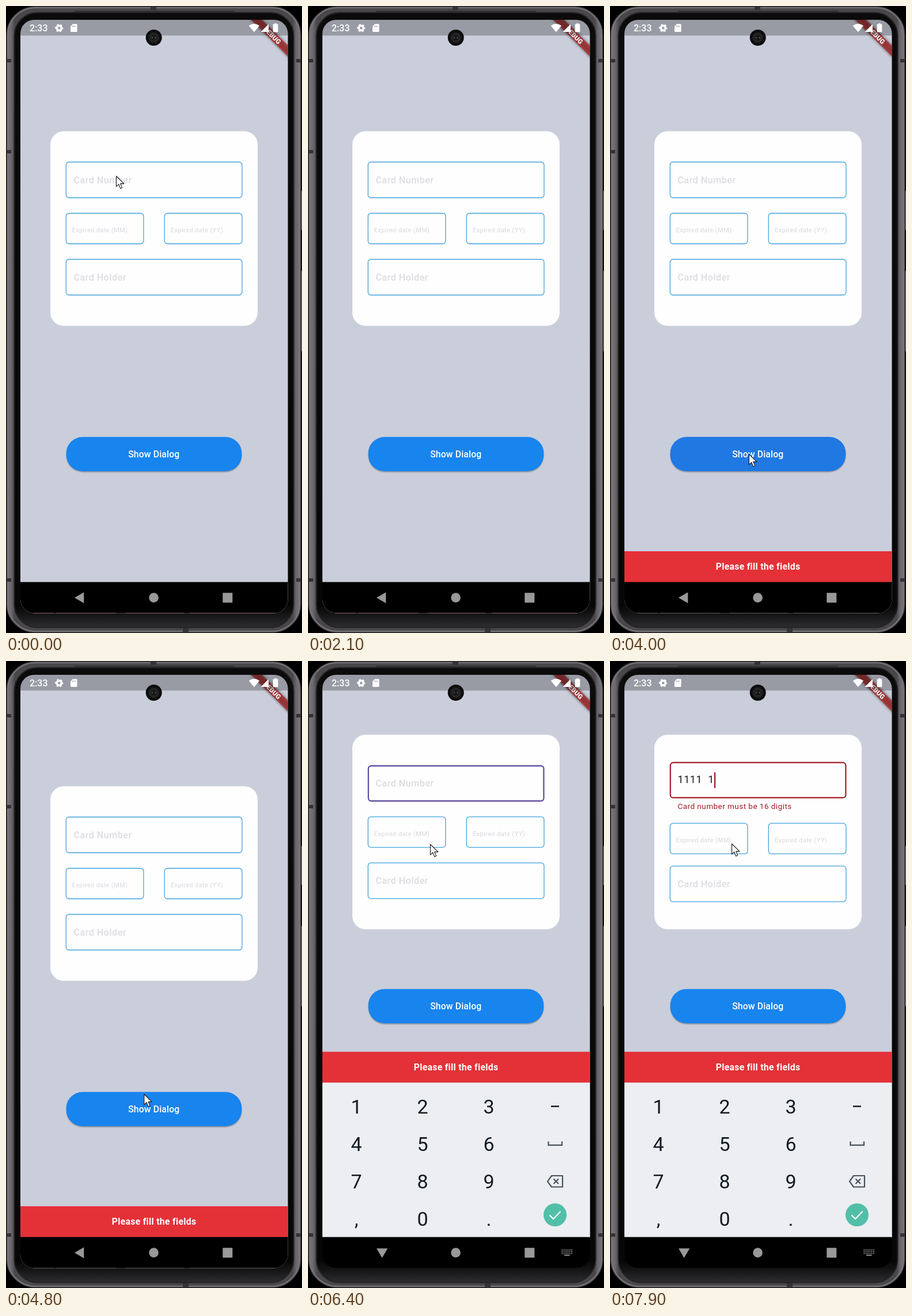
An HTML page that plays this animation: 514x1089 px, repeating every 8000 ms.

```html
<!DOCTYPE html>
<html lang="en">
<head>
<meta charset="utf-8">
<title>Card form</title>
<style>
html, body { margin: 0; width: 100%; height: 100%; overflow: hidden; background: #000; }
svg { display: block; width: 514px; height: 1089px; font-family: Roboto, Arial, sans-serif; }
text { white-space: pre; }
.mid { text-anchor: middle; }
.field { fill: none; stroke: #42a3dc; stroke-width: 1.3; }
.hint { font-weight: 500; font-size: 16.1px; letter-spacing: .5px; fill: #dcdde1; }
.small { font-weight: 500; font-size: 11.2px; letter-spacing: .25px; fill: #dfe0e4; }
.key { font-size: 34px; fill: #121920; text-anchor: middle; }
.line { fill: none; stroke: #48505a; stroke-width: 2.2; }
</style>
</head>
<body>
<svg viewBox="0 0 514 1089" xmlns="http://www.w3.org/2000/svg">
  <defs>
    <linearGradient id="side">
      <stop offset="0" stop-color="#3a383b"/><stop offset=".006" stop-color="#747176"/>
      <stop offset=".016" stop-color="#6b686d"/><stop offset=".028" stop-color="#49474a"/>
      <stop offset=".972" stop-color="#49474a"/><stop offset=".984" stop-color="#6b686d"/>
      <stop offset=".994" stop-color="#747176"/><stop offset="1" stop-color="#3a383b"/>
    </linearGradient>
    <linearGradient id="glass" x2="0" y2="1">
      <stop offset="0" stop-color="#0b0b0c"/><stop offset=".965" stop-color="#070707"/>
      <stop offset=".985" stop-color="#1b1b1d"/><stop offset="1" stop-color="#2e2d30"/>
    </linearGradient>
    <clipPath id="screen"><rect x="25" y="24" width="464.5" height="1030.5" rx="24"/></clipPath>
    <filter id="soft" x="-20%" y="-100%" width="140%" height="300%"><feGaussianBlur stdDeviation="2.6"/></filter>
    <filter id="drop" x="-5%" y="-20%" width="110%" height="150%"><feGaussianBlur stdDeviation="1"/></filter>
  </defs>

  <!-- phone body -->
  <rect width="514" height="1089" fill="#000"/>
  <g fill="#77747a" stroke="#2b2a2c" stroke-width=".8">
    <rect x="509" y="321" width="6" height="68" rx="2"/>
    <rect x="509" y="460" width="6" height="140" rx="2"/>
  </g>
  <rect x=".8" y=".8" width="511.4" height="1087.4" rx="50" fill="url(#side)" stroke="#2f2d30" stroke-width="1.2"/>
  <rect x="3" y="3" width="507" height="1083" rx="48" fill="none" stroke="#78757a" stroke-width="2"/>
  <g fill="#343235">
    <rect x="1" y="92" width="8" height="6"/><rect x="1" y="250" width="8" height="6"/>
    <rect x="1" y="994" width="8" height="6"/><rect x="504" y="92" width="8" height="6"/>
    <rect x="504" y="994" width="8" height="6"/><rect x="251" y="1" width="10" height="6"/>
    <rect x="307" y="1080" width="10" height="8"/><rect x="118" y="8" width="279" height="3" rx="1.5"/>
  </g>
  <rect x="14.5" y="11.5" width="485" height="1068" rx="40" fill="url(#glass)" stroke="#232224" stroke-width="2"/>

  <g clip-path="url(#screen)">
    <rect x="25" y="24" width="465" height="977" fill="#cacedb"/>

    <g id="card">
      <rect x="77" y="217.5" width="360" height="338" rx="23" fill="#fffeff"/>
      <g id="number">
        <rect id="box" class="field"/>
        <text id="hint" class="hint" x="117.5" y="307.5">Card Number</text>
        <text id="typed" x="117.5" y="307.5" font-size="18" letter-spacing=".56" fill="#1c1b1f"></text>
        <rect id="caret" y="288.5" width="2.3" height="27"/>
      </g>
      <text id="error" x="117.5" y="346.3" font-size="13.54" letter-spacing=".45" fill="#a01c26">Card number must be 16 digits</text>
      <g id="dates">
        <rect class="field" x="104.3" y="360" width="134.6" height="53" rx="5"/>
        <rect class="field" x="275.3" y="360" width="134.6" height="53" rx="5"/>
        <text class="small" x="114.6" y="393">Expired date (MM)</text>
        <text class="small" x="286" y="393">Expired date (YY)</text>
      </g>
      <g id="holder">
        <rect class="field" x="104.3" y="440" width="305.6" height="62" rx="5"/>
        <text class="hint" x="117.5" y="476.5">Card Holder</text>
      </g>
    </g>

    <g id="button">
      <rect x="105" y="750.5" width="304" height="59" rx="28" fill="#000" opacity=".35" filter="url(#drop)"/>
      <rect x="104.7" y="748.5" width="304.6" height="59.5" rx="28" fill="#1884ee"/>
      <rect id="press" x="104.7" y="748.5" width="304.6" height="59.5" rx="28" fill="#2f62cf"/>
      <text class="mid" x="256.8" y="783.7" font-size="15.8" font-weight="500" letter-spacing=".12" fill="#fff">Show Dialog</text>
    </g>

    <g id="snack">
      <rect x="25" y="947" width="465" height="54" fill="#e43138"/>
      <text id="message" class="mid" x="257" y="979.4" font-size="15.8" font-weight="700" letter-spacing=".28" fill="#fff">Please fill the fields</text>
    </g>

    <g id="keyboard">
      <rect x="25" y="732.3" width="465" height="270" fill="#eceef2"/>
      <g id="keys"></g>
      <path d="M422 773.5h14" stroke="#121920" stroke-width="2.6"/>
      <path class="line" d="M417.5 834.5v6.3h23.5v-6.3"/>
      <path class="line" d="M423 894h19v19.5h-19l-7-9.7z" stroke-linejoin="round"/>
      <path class="line" d="M426.5 899.5l8.5 8.5m0-8.5l-8.5 8.5"/>
      <circle cx="429" cy="962" r="20" fill="#52bfa9"/>
      <path d="M419.5 962.5l6.5 6.5 12.5-13" fill="none" stroke="#fff" stroke-width="2.2"/>
    </g>

    <!-- corner banner -->
    <g transform="translate(489.5 24) rotate(45)">
      <rect x="-50" y="31.6" width="100" height="13.5" fill="#000" opacity=".55" filter="url(#soft)"/>
      <rect x="-50" y="31.6" width="100" height="13.5" fill="#b71c1c" opacity=".63"/>
      <text class="mid" y="42.5" font-size="11.5" font-weight="900" fill="#fff">DEBUG</text>
    </g>

    <!-- status bar -->
    <rect x="25" y="24" width="465" height="27.3" fill="#000" opacity=".25"/>
    <g fill="#fff">
      <text x="41" y="44" font-size="16" font-weight="500">2:33</text>
      <circle cx="92.3" cy="38.3" r="4" fill="none" stroke="#fff" stroke-width="3.4"/>
      <circle cx="92.3" cy="38.3" r="5.8" fill="none" stroke="#fff" stroke-width="2.6" stroke-dasharray="3.3 2.774" stroke-dashoffset="1.65"/>
      <path d="M116 31.3h6.3a1.3 1.3 0 0 1 1.3 1.3v11.2a1.3 1.3 0 0 1-1.3 1.3h-9a1.3 1.3 0 0 1-1.3-1.3v-8.4z"/>
      <path d="M115.6 34v2.6m2.3-2.6v2.6m2.3-2.6v2.6" stroke="#999ca6" stroke-width="1.1"/>
      <path d="M421.7 34.3q9.2-7.2 18.4 0l-9.2 11z"/>
      <path d="M456 31.5v13.5h-13.5z"/>
      <path d="M466 31.5v-1.3h4v1.3h2.3v13.8h-8.6v-13.8z"/>
    </g>

    <!-- navigation bar -->
    <rect x="25" y="1000.5" width="465" height="54" fill="#000"/>
    <g fill="#999">
      <path id="back"/>
      <circle cx="256.6" cy="1027.6" r="8.3"/>
      <rect x="376.3" y="1019.3" width="17" height="17" rx="1"/>
      <g id="toggle">
        <g id="dots"></g>
        <rect x="445" y="1031.2" width="9.5" height="1.8"/>
      </g>
    </g>
  </g>

  <!-- camera -->
  <circle cx="256.7" cy="55" r="14" fill="#0c0c0d"/>
  <circle cx="256.7" cy="55" r="9.3" fill="#242325" stroke="#161617" stroke-width="1.5"/>
  <circle cx="256.7" cy="55" r="4.8" fill="#171618"/>
  <circle cx="254" cy="55" r=".9" fill="#77757a"/><circle cx="259.5" cy="55" r=".9" fill="#77757a"/>

  <path id="pointer" d="M.5 .5v18.2l4.2-4 3 7.2 3-1.3-3-7h6.2z" fill="#fff" stroke="#151517" stroke-width="1.1" stroke-linejoin="round"/>
</svg>
<script>
const LOOP = 8000;
const FOCUS = 5650;
const KEYS = [6850, 7030, 7210, 7390, 7700];
const TEXTS = ["", "1", "11", "111", "1111", "1111  1"];
// pointer stops: [time, x, y]
const STOPS = [[2900, 290, 640], [3300, 241, 778], [4700, 241, 778], [5400, 212, 318], [7300, 212, 318], [7500, 211, 317]];

const $ = id => document.getElementById(id);
const set = (id, attrs) => { for (const k in attrs) $(id).setAttribute(k, attrs[k]); };
const shift = (id, y) => set(id, { transform: `translate(0 ${y.toFixed(2)})` });
const part = (t, a, b) => Math.min(1, Math.max(0, (t - a) / (b - a)));
const smooth = p => p * p * (3 - 2 * p);
const settle = p => 1 - (1 - p) ** 3;

$("keys").innerHTML = ["123", "456", "789", ",0."].map((row, r) =>
  [...row].map((ch, c) => `<text class="key" x="${84 + c * 115}" y="${785.5 + r * 65.2}">${ch}</text>`).join("")).join("");
$("dots").innerHTML = Array.from({ length: 18 }, (_, i) =>
  `<rect x="${440.5 + i % 6 * 3.3}" y="${1022 + Math.floor(i / 6) * 3.1}" width="1.8" height="1.8"/>`).join("");

function pointerAt(t) {
  if (t < 1000) return [191, 295];
  if (t < STOPS[0][0]) return null;
  const i = STOPS.findIndex(s => s[0] > t);
  if (i < 0) return STOPS[STOPS.length - 1].slice(1);
  const [t0, x0, y0] = STOPS[i - 1], [t1, x1, y1] = STOPS[i];
  const p = smooth(part(t, t0, t1));
  return [x0 + (x1 - x0) * p, y0 + (y1 - y0) * p];
}

function draw(t) {
  const focused = t >= FOCUS;
  const count = KEYS.filter(k => k <= t).length;
  const failed = count > 0;
  const lift = 268.3 * settle(part(t, 5950, 6280));
  const slide = settle(part(t, 3680, 3930));

  // layout follows the keyboard inset
  shift("card", -lift / 3);
  shift("button", -lift * 2 / 3);
  shift("snack", 54 * (1 - slide) - lift);
  shift("keyboard", 270 - lift * 270 / 268.3);
  set("message", { opacity: part(t, 3780, 3930) });
  set("press", { opacity: .35 * part(t, 3600, 3750) * (1 - part(t, 4000, 4250)) });

  shift("number", failed ? -5.6 : 0);
  shift("dates", failed ? 11.4 : 0);
  shift("holder", failed ? 5.6 : 0);
  set("error", { opacity: failed ? part(t, KEYS[0], KEYS[0] + 167) : 0 });

  const ink = failed ? "#a01c26" : "#5a489b";
  const inset = focused ? .5 : 0;
  set("box", {
    x: 104.3 + inset, y: 271 + inset, width: 305.6 - inset * 2, height: 62 - inset * 2, rx: 5,
    style: focused ? `stroke:${ink};stroke-width:2.2` : ""
  });
  set("hint", { opacity: failed ? 0 : 1 });
  const text = TEXTS[count];
  if ($("typed").textContent !== text) $("typed").textContent = text;

  const last = failed ? KEYS[count - 1] : FOCUS;
  const digits = text.replace(/ /g, "").length;
  set("caret", {
    x: 117.6 + digits * 10.67 + (text.length - digits) * 5,
    fill: ink,
    opacity: focused && (t - last) % 1000 < 500 ? 1 : 0
  });

  set("back", { d: focused ? "M119 1020.3h19.3l-9.6 16.4z" : "M135.3 1018.2v19l-16.3-9.5z" });
  set("toggle", { opacity: focused ? 1 : 0 });

  const at = pointerAt(t);
  set("pointer", { opacity: at ? 1 : 0 });
  if (at) set("pointer", { transform: `translate(${at[0].toFixed(1)} ${at[1].toFixed(1)})` });
}

const start = performance.now();
function tick() {
  draw((performance.now() - start) % LOOP);
  requestAnimationFrame(tick);
}
draw(0);
requestAnimationFrame(tick);
</script>
</body>
</html>
```
